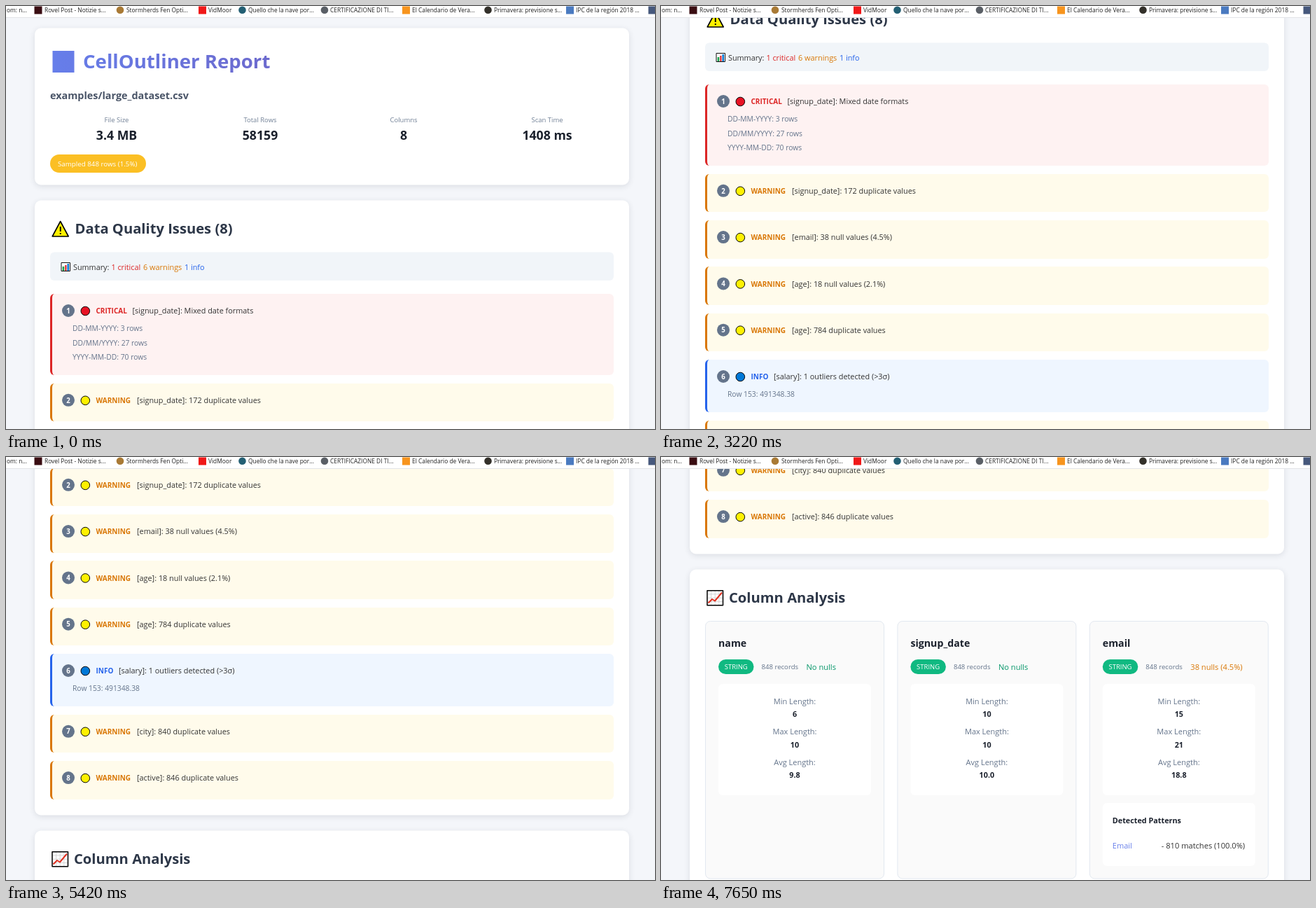
An HTML page with a canvas for the animation above (8000 ms loop, 927 by 604 pixels).

```html
<!DOCTYPE html>
<html lang="en">
<head>
<meta charset="utf-8">
<title>Report scroll</title>
<style>
  html, body { margin: 0; width: 100%; height: 100%; overflow: hidden; background: #f4f6fa; }
  canvas { display: block; }
</style>
</head>
<body>
<canvas id="stage" width="927" height="604"></canvas>
<script>
const ctx = document.getElementById('stage').getContext('2d');
const LOOP = 8000;
const SCROLL_STEP = 224 / 3;
const SCROLL_TIMES = [1200, 2010, 2720, 3220, 3930, 4530, 5420, 6130, 6530, 7060, 7550, 7650];

const INK = '#1a202c', HEADING = '#2d3748', MUTED = '#64748b', BODY = '#333';
const LEVELS = {
  CRITICAL: { line: '#dc2626', fill: '#fef2f2', dot: '#e81224', textX: 180.5 },
  WARNING: { line: '#d97706', fill: '#fffbeb', dot: '#fff100', textX: 187 },
  INFO: { line: '#2563eb', fill: '#eff6ff', dot: '#0078d7', textX: 161 }
};
const ISSUES = [
  ['CRITICAL', '[signup_date]: Mixed date formats',
    'DD-MM-YYYY: 3 rows', 'DD/MM/YYYY: 27 rows', 'YYYY-MM-DD: 70 rows'],
  ['WARNING', '[signup_date]: 172 duplicate values'],
  ['WARNING', '[email]: 38 null values (4.5%)'],
  ['WARNING', '[age]: 18 null values (2.1%)'],
  ['WARNING', '[age]: 784 duplicate values'],
  ['INFO', '[salary]: 1 outliers detected (>3σ)', 'Row 153: 491348.38'],
  ['WARNING', '[city]: 840 duplicate values'],
  ['WARNING', '[active]: 846 duplicate values']
];
const COLUMNS = [
  { name: 'name', nulls: 'No nulls', lengths: ['6', '10', '9.8'] },
  { name: 'signup_date', nulls: 'No nulls', lengths: ['10', '10', '10.0'] },
  { name: 'email', nulls: '38 nulls (4.5%)', lengths: ['15', '21', '18.8'], matches: '- 810 matches (100.0%)' }
];
// label, label x, icon shape, icon centre x, icon colour
const BOOKMARKS = [
  ['om: n...', 1],
  ['Rovel Post - Notizie s...', 55, 'square', 46, '#3a0d12'],
  ['Stormherds Fen Opti...', 172, 'circle', 163, '#a97a35'],
  ['VidMoor', 289, 'square', 280.5, '#f01818'],
  ['Quello che la nave por...', 346, 'circle', 337.5, '#235f73'],
  ['CERTIFICAZIONE DI TI...', 463, 'circle', 455, '#5a5f66'],
  ['El Calendario de Vera...', 580, 'square', 571.5, '#f7941d'],
  ['Primavera: previsione s...', 697, 'circle', 688.5, '#33302a'],
  ['IPC de la región 2018 ...', 814, 'square', 805.5, '#4a7ac0'],
  ['', 930, 'square', 923, '#46587c']
];

// Whole-pixel baselines keep the letters sharp.
function text(str, x, y, size, color, weight = 400, align = 'left') {
  ctx.font = `${weight} ${size}px "Open Sans", "Noto Sans", sans-serif`;
  ctx.textAlign = align;
  ctx.fillStyle = color;
  ctx.fillText(str, x, Math.round(y));
}

function box(x, y, w, h, radius, fill, stroke) {
  ctx.beginPath();
  ctx.roundRect(x, y, w, h, radius);
  ctx.fillStyle = fill;
  ctx.fill();
  if (stroke) {
    ctx.strokeStyle = stroke;
    ctx.lineWidth = 1;
    ctx.stroke();
  }
}

function disc(x, y, r, fill, stroke) {
  box(x - r, y - r, 2 * r, 2 * r, r, fill, stroke);
}

function line(points, color, width, closed, fill) {
  ctx.beginPath();
  points.forEach(([x, y]) => ctx.lineTo(x, y));
  if (closed) ctx.closePath();
  if (fill) {
    ctx.fillStyle = fill;
    ctx.fill();
  }
  ctx.strokeStyle = color;
  ctx.lineWidth = width;
  ctx.lineJoin = 'round';
  ctx.stroke();
}

function card(y, h) {
  ctx.save();
  ctx.shadowColor = 'rgba(30, 41, 59, .12)';
  ctx.shadowBlur = 8;
  ctx.shadowOffsetY = 2;
  box(41, y, 849, h, 9, '#fff');
  ctx.restore();
}

function drawOverview() {
  card(31.5, 224);
  const gradient = ctx.createLinearGradient(63, 0, 868, 0);
  gradient.addColorStop(0, '#667eea');
  gradient.addColorStop(1, '#764ba2');
  ctx.fillStyle = gradient;
  ctx.fillRect(66.5, 64, 31, 31);
  text('CellOutliner Report', 110, 89, 27.6, gradient, 700);
  text('examples/large_dataset.csv', 63, 133, 14.4, '#4a5568', 700);
  [['File Size', '3.4 MB'], ['Total Rows', '58159'], ['Columns', '8'], ['Scan Time', '1408 ms']]
    .forEach(([label, value], i) => {
      const x = 158 + 205 * i;
      text(label, x, 166.3, 9.5, '#718096', 400, 'center');
      text(value, x, 191.3, 17.7, INK, 700, 'center');
    });
  box(63, 212, 137, 26, 13, '#fbbf24');
  text('Sampled 848 rows (1.5%)', 74, 229, 9.75, '#fff');
}

function drawWarningSign() {
  line([[77.7, 307.5], [89.2, 329], [66.2, 329]], '#000', 1.6, true, '#fff100');
  ctx.fillStyle = '#000';
  ctx.fillRect(76.8, 315, 1.9, 7);
  ctx.fillRect(76.8, 324, 1.9, 2);
}

function drawBarIcon() {
  box(79, 366.5, 12.5, 12, 0, '#fff', '#111');
  [['#16a34a', 6], ['#e03a3e', 8], ['#0078d7', 10]].forEach(([color, h], i) => {
    ctx.fillStyle = color;
    ctx.fillRect(80.7 + 3.4 * i, 378 - h, 2.5, h);
  });
}

function drawIssue(y, number, [level, title, ...details]) {
  const { line: edge, fill, dot, textX } = LEVELS[level];
  const advance = 54.6 + 20.5 * details.length;
  const top = Math.round(y), h = Math.round(y + advance) - top;
  const inner = { x: 3, y: 6 };
  box(63, top, 8, h, [6, 0, 0, 6], edge);
  box(66, top, 802, h, [inner, 6, 6, inner], fill);
  disc(89, y + 24, 9, MUTED);
  text(number, 89, y + 27.7, 9.7, '#fff', 700, 'center');
  disc(113.3, y + 24.5, 6.3, dot, '#000');
  text(level, 128.5, y + 28.3, 10, edge, 700);
  text(title, textX, y + 28.4, 10.85, BODY);
  details.forEach((detail, i) => text(detail, 95, y + 53.4 + 20.5 * i, 10.3, MUTED));
  return advance;
}

function drawIssues() {
  card(277.5, 757);
  drawWarningSign();
  text('Data Quality Issues (8)', 98.5, 325.3, 20.2, HEADING, 700);
  box(63, 351.5, 805, 40.5, 6, '#f1f5f9');
  drawBarIcon();
  text('Summary:', 96, 376.5, 10.8, BODY);
  text('1 critical', 150.5, 376.5, 10.8, '#dc2626');
  text('6 warnings', 196, 376.5, 10.9, '#d97706');
  text('1 info', 255, 376.5, 10.8, '#2563eb');
  let y = 411;
  ISSUES.forEach((issue, i) => { y += drawIssue(y, i + 1, issue) + 11.7; });
}

function drawChartIcon() {
  box(66, 1086.7, 22.5, 21, 0, '#fff');
  for (let i = 1; i < 4; i++) {
    const x = 66 + 5.6 * i, y = 1086.7 + 5.25 * i;
    line([[x, 1087], [x, 1107]], '#ccc', 0.8);
    line([[67, y], [88, y]], '#ccc', 0.8);
  }
  line([[67.5, 1104.5], [73, 1099], [77, 1101.5], [87, 1089.5]], '#e03020', 2);
  line([[66, 1086.7], [88.5, 1086.7], [88.5, 1107.7], [66, 1107.7]], '#000', 1.5, true);
}

function drawColumn(x, { name, nulls, lengths, matches }) {
  const left = x + 19, center = x + 128;
  box(x + 0.5, 1130.5, 255, 367.5, 7, '#fafafa', '#e2e8f0');
  text(name, left, 1167.3, 14.2, INK, 700);
  box(left, 1185, 50.5, 21, 10.5, '#10b981');
  text('STRING', left + 25.2, 1199.2, 9.5, '#fff', 400, 'center');
  text('848 records', left + 61.5, 1199.2, 9.6, MUTED);
  text(nulls, left + 125.5, 1199.7, 11.1, matches ? '#d97706' : '#059669');
  box(left, 1220, 218, 159, 6, '#fff');
  ['Min', 'Max', 'Avg'].forEach((kind, i) => {
    const y = 1249 + 43.3 * i;
    text(kind + ' Length:', center, y, 11, MUTED, 400, 'center');
    text(lengths[i], center, y + 18.4, 10.8, INK, 700, 'center');
  });
  if (matches) {
    box(left, 1390, 218, 90, 6, '#fff');
    text('Detected Patterns', left + 14, 1418.6, 10.8, INK, 700);
    text('Email', left + 14, 1454.5, 11, '#667eea');
    text(matches, left + 203.3, 1454.5, 11.1, BODY, 400, 'right');
  }
}

function drawColumns() {
  card(1056.5, 600);
  drawChartIcon();
  text('Column Analysis', 97, 1104, 20.2, HEADING, 700);
  COLUMNS.forEach((column, i) => drawColumn(63 + 274.4 * i, column));
}

function drawBookmarks() {
  ctx.fillStyle = '#fff';
  ctx.fillRect(0, 0, 927, 16);
  ctx.fillStyle = '#e2e4e8';
  ctx.fillRect(0, 16, 927, 1);
  BOOKMARKS.forEach(([label, x, shape, iconX, color]) => {
    if (shape === 'circle') disc(iconX, 5.7, 5.3, color);
    if (shape === 'square') box(iconX - 5.5, 0.5, 11, 11, 0, color);
    text(label, x, 9.4, 8.4, '#222');
  });
}

function draw(scroll) {
  ctx.fillStyle = '#f4f6fa';
  ctx.fillRect(0, 0, 927, 604);
  ctx.save();
  ctx.translate(0, -scroll);
  drawOverview();
  drawIssues();
  drawColumns();
  ctx.restore();
  drawBookmarks();
}

const start = performance.now();
function tick() {
  const time = (performance.now() - start) % LOOP;
  const steps = SCROLL_TIMES.filter(t => t <= time).length;
  draw(Math.round(steps * SCROLL_STEP));
  requestAnimationFrame(tick);
}
tick();
</script>
</body>
</html>
```
